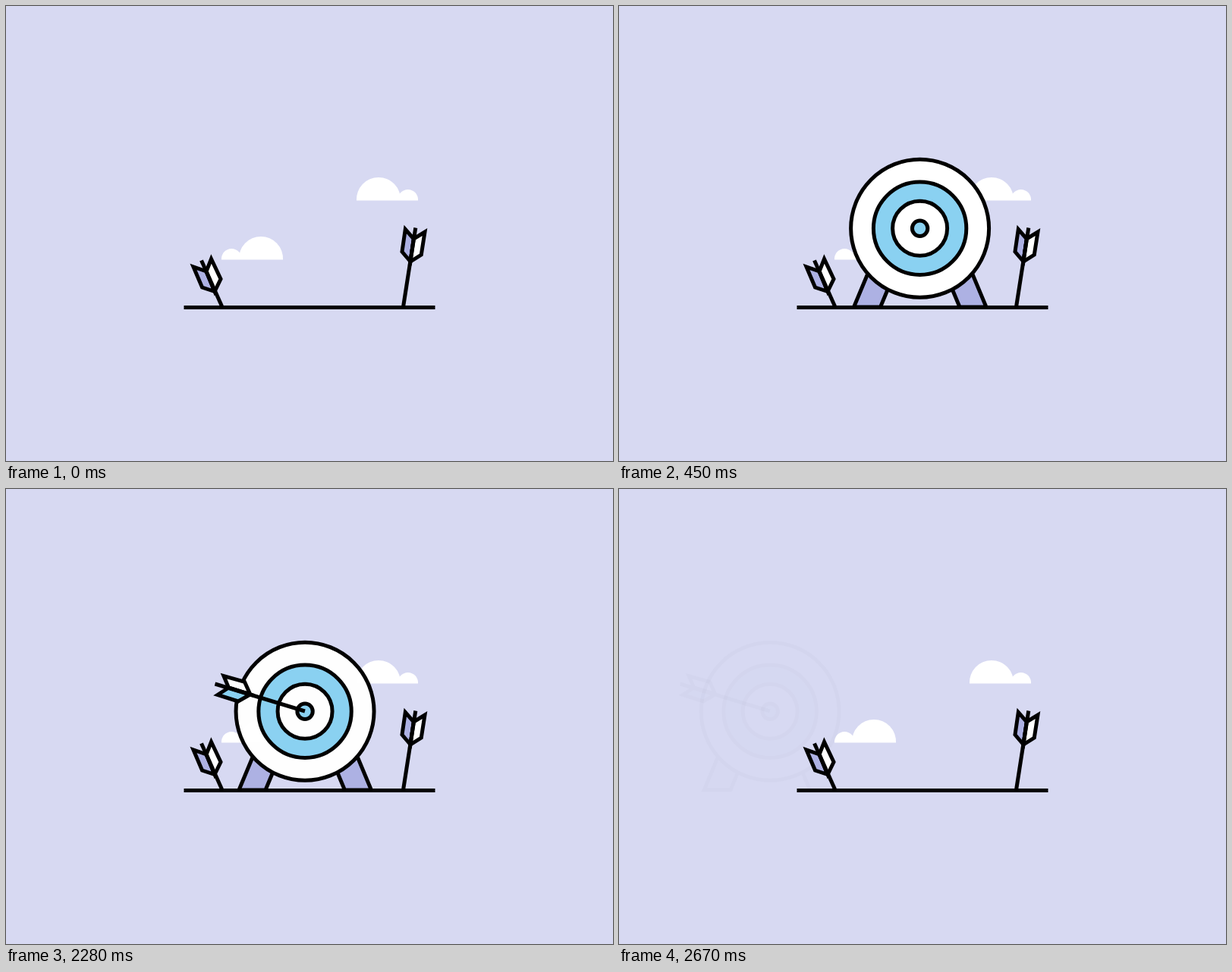
Animation, 800 px wide and 600 px high, one loop 2.73 s. Source, as an HTML page:

```html
<!DOCTYPE html>
<html lang="en">
<head>
<meta charset="utf-8">
<title>Bullseye</title>
<style>
  html, body { margin: 0; width: 100%; height: 100%; overflow: hidden; background: #d7d9f2; }
  svg { display: block; width: 800px; height: 600px; }
  .ink { fill: none; stroke: #000; stroke-width: 5; stroke-miterlimit: 10; }
  .white { fill: #fff; }
  .blue { fill: #8ad1f1; }
  .lilac { fill: #adb1e3; }
</style>
</head>
<body>
<svg viewBox="0 0 800 600">
  <defs>
    <path id="cloud" class="white" d="M462 256.5A29.04 29.04 0 1 1 520 256.5ZM516.5 256.5A13.3 13.3 0 1 1 543 256.5Z"/>
  </defs>

  <use href="#cloud"/>
  <use href="#cloud" transform="translate(827 78) scale(-1 1)"/>

  <g id="target" class="ink" opacity="0">
    <path class="lilac" d="M309.5 397H344.5L369.5 337H334.5ZM484 397H449L424 337H459Z"/>
    <g transform="translate(396.6 293.3)">
      <circle class="white" r="91"/>
      <circle class="blue" r="61.2"/>
      <circle class="white" r="36"/>
      <circle class="blue" r="10.2"/>
    </g>
  </g>

  <g id="arrow" class="ink" opacity="0">
    <path class="white" d="M296 262L289.5 246.5L317 254.3L324.5 271Z"/>
    <path class="blue" d="M296 262L281.5 271.5L308.5 280L324.5 271Z"/>
    <path d="M278 257L396.5 293"/>
  </g>

  <g class="ink">
    <path class="lilac" d="M264 350L247 344L258.5 371L275 376.5Z"/>
    <path class="white" d="M264 350L270.5 333.5L283 360L275 376.5Z"/>
    <path d="M257.5 335.5L285 397"/>
    <path class="lilac" d="M537.3 307L526.3 294.5L522 324L533 337Z"/>
    <path class="white" d="M537.3 307L552 298L547.3 328L533 337Z"/>
    <path d="M539.8 292.5L523.5 397"/>
    <path d="M234.5 397.5H565.5"/>
  </g>
</svg>
<script>
  const LOOP = 2730, TICK = 30, SLIDE = 200;
  const target = document.getElementById('target');
  const arrow = document.getElementById('arrow');

  // Eased progress between two times
  const ease = (t, from, to) => {
    const k = Math.min(1, Math.max(0, (t - from) / (to - from)));
    return k * k * (3 - 2 * k);
  };

  const place = (el, x, y, opacity) => {
    el.setAttribute('transform', `translate(${x} ${y})`);
    el.setAttribute('opacity', opacity);
  };

  const start = performance.now();

  function draw() {
    const elapsed = (performance.now() - start) % LOOP;
    const t = Math.floor(elapsed / TICK) * TICK;
    const enter = ease(t, 0, 450);
    const fly = ease(t, 750, 990);
    const leave = ease(t, 2250, 2700);

    place(target, SLIDE * (1 - enter - leave), 0, enter * (1 - leave));
    place(arrow, -183 * (1 - fly) - SLIDE * leave, -61 * (1 - fly), fly * (1 - leave));
    requestAnimationFrame(draw);
  }
  draw();
</script>
</body>
</html>
```
